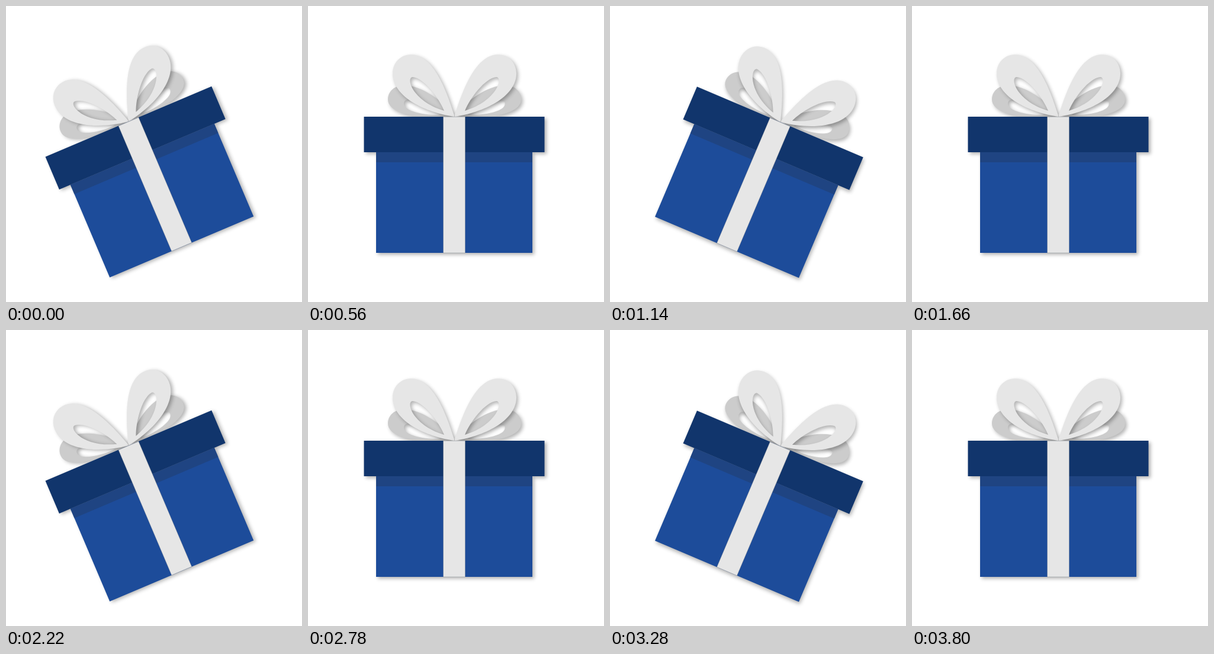
Write an HTML page with a canvas that moves like this. It is 500 px wide and 500 px high and loops after 4300 ms.

```html
<!DOCTYPE html>
<html lang="en">
<head>
<meta charset="utf-8">
<title>Rocking gift</title>
<style>
  html, body { margin: 0; width: 100%; height: 100%; overflow: hidden; background: #fff; }
  canvas { display: block; }
</style>
</head>
<body>
<canvas id="stage" width="500" height="500"></canvas>
<script>
const ctx = document.getElementById('stage').getContext('2d');

const LOOP = 4300;
const CENTER = { x: 247, y: 302 };
const LEFT = { x: 251.8, y: 301.1, angle: -23 };
const UPRIGHT = { x: 247, y: 302, angle: 0 };
const RIGHT = { x: 242.4, y: 301.8, angle: 23 };

// Each pose holds until the given time, then snaps to the next.
const POSES = [
  [560, LEFT], [1140, UPRIGHT], [1660, RIGHT], [2220, UPRIGHT],
  [2780, LEFT], [3280, UPRIGHT], [3800, RIGHT], [LOOP, UPRIGHT]
];

const backLoop = new Path2D(
  'M245 186 C230 160 190 134 163 134 C145 134 135 145 135 158 C135 176 165 187 205 187 Z ' +
  'M225 184 C210 170 185 158 170 158 C160 158 160 168 167 173 C178 181 205 185 225 184 Z');
const frontLoop = new Path2D(
  'M247 184 C236 150 214 82 174 82 C156 82 143 96 143 114 C143 150 190 178 247 187 Z ' +
  'M230 177 C221 155 196 122 177 120 C165 120 175 160 230 177 Z');

function setShadow(angle) {
  const offset = 3;
  ctx.shadowColor = 'rgba(0, 0, 0, 0.3)';
  ctx.shadowBlur = 6;
  // Canvas shadows ignore the transform, so turn the offset with the box.
  ctx.shadowOffsetX = offset * (Math.cos(angle) - Math.sin(angle));
  ctx.shadowOffsetY = offset * (Math.cos(angle) + Math.sin(angle));
}

function rect(color, x, y, w, h) {
  ctx.fillStyle = color;
  ctx.fillRect(x, y, w, h);
}

function loopPair(path, color) {
  ctx.fillStyle = color;
  for (const side of [1, -1]) {
    ctx.save();
    if (side < 0) {
      ctx.translate(495, 0);
      ctx.scale(-1, 1);
    }
    ctx.fill(path, 'evenodd');
    ctx.restore();
  }
}

function drawGift(pose) {
  const angle = pose.angle * Math.PI / 180;
  ctx.save();
  ctx.translate(pose.x, pose.y);
  ctx.rotate(angle);
  ctx.translate(-CENTER.x, -CENTER.y);

  setShadow(angle);
  loopPair(backLoop, '#cccccc');
  loopPair(frontLoop, '#e6e6e6');
  rect('#1d4c9a', 115, 247, 264, 170);
  rect('#11356c', 94.5, 187, 305, 60);

  ctx.shadowColor = 'transparent';
  rect('#1f4482', 115, 247, 264, 17);
  rect('#e6e6e6', 228.5, 187, 37, 230);
  ctx.strokeStyle = 'rgba(90, 100, 115, 0.5)';
  ctx.lineWidth = 0.6;
  ctx.strokeRect(228.5, 187.3, 37, 229.7);
  ctx.restore();
}

function frame(now) {
  const time = now % LOOP;
  ctx.fillStyle = '#fff';
  ctx.fillRect(0, 0, 500, 500);
  drawGift(POSES.find(([end]) => time < end)[1]);
  requestAnimationFrame(frame);
}

const start = performance.now();
const tick = now => frame(Math.max(0, now - start));
(function run() {
  const loop = now => {
    const time = Math.max(0, now - start) % LOOP;
    rect('#fff', 0, 0, 500, 500);
    drawGift(POSES.find(([end]) => time < end)[1]);
    requestAnimationFrame(loop);
  };
  loop(start);
})();
</script>
</body>
</html>
```
